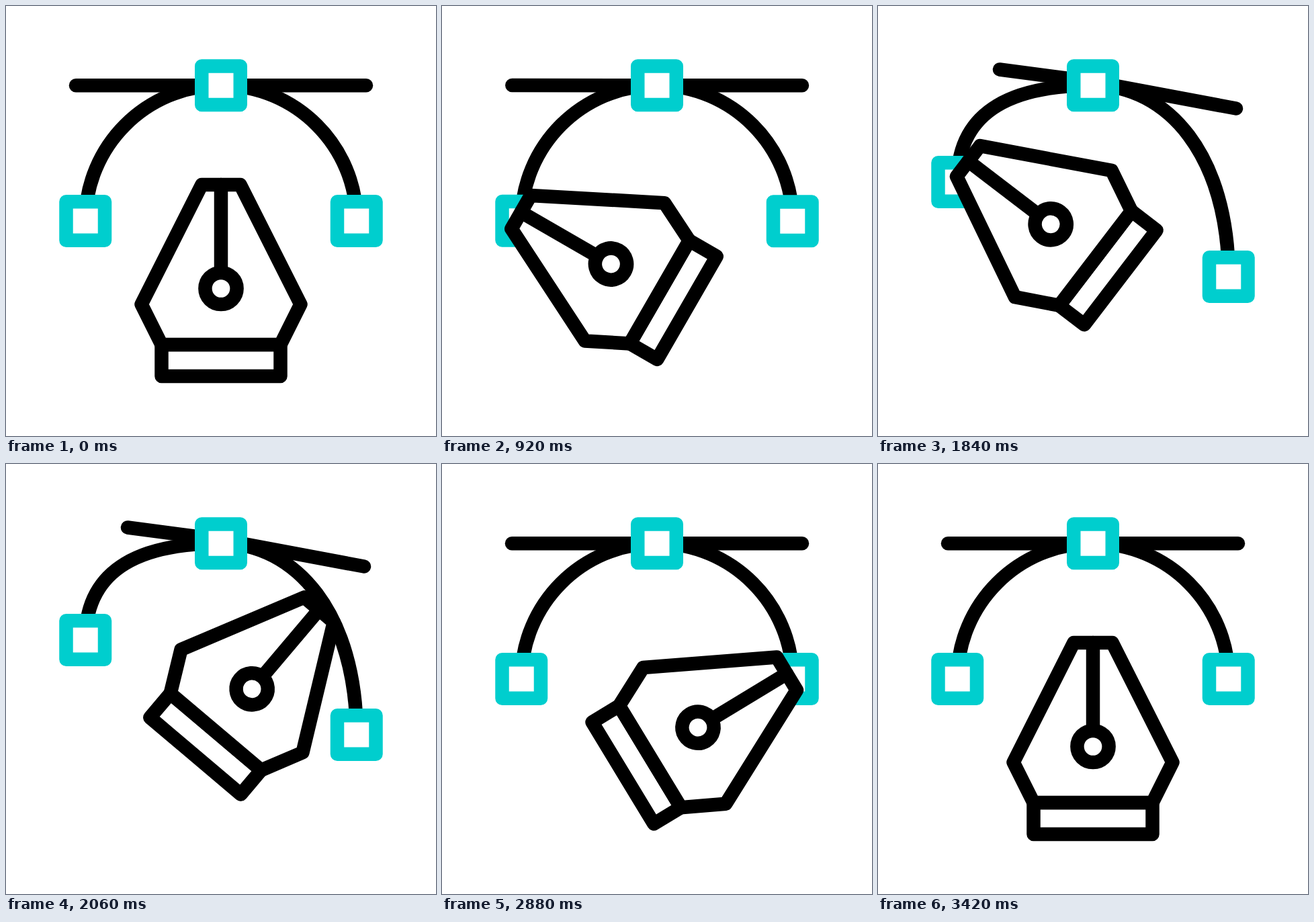
Recreate the animation shown at these times as an HTML page. Size 640 px wide and 640 px high, loop 3600 ms.

```html
<!DOCTYPE html>
<html lang="en">
<head>
<meta charset="utf-8">
<title>Pen tool</title>
<style>
  html, body { margin: 0; width: 100%; height: 100%; overflow: hidden; background: #fff; }
  svg { display: block; width: 100%; height: 100%; }
  path, rect, circle { stroke-width: 20.5; stroke-linecap: round; stroke-linejoin: round; }
  .line { fill: none; stroke: #000; }
  .solid { fill: #fff; stroke: #000; }
  .node { fill: #fff; stroke: #00cece; }
</style>
</head>
<body>
<svg viewBox="0 0 640 640">
  <path id="handle" class="line"/>
  <path id="curve" class="line"/>
  <rect class="node" x="291.25" y="89.5" width="57.5" height="57.5"/>
  <rect id="left" class="node" x="89.5" width="57.5" height="57.5"/>
  <rect id="right" class="node" x="493" width="57.5" height="57.5"/>
  <!-- pen, with its origin at the middle of the base -->
  <g id="pen">
    <path class="solid" d="M-88.5-47V0H88.5V-47Z"/>
    <path class="solid" d="M-28.7-285H28.7L118.5-107L88.5-47H-88.5L-118.5-107Z"/>
    <path class="line" d="M0-285V-155"/>
    <circle class="solid" cy="-130.5" r="23.6"/>
  </g>
</svg>
<script>
const LOOP = 3600;
const $ = id => document.getElementById(id);
const lerp = (a, b, k) => a + (b - a) * k;

// Bezier easing with flat ends; a and b are the x of its control points
function ease(a, b) {
  return x => {
    let lo = 0, hi = 1, u = 0.5;
    for (let i = 0; i < 24; i++) {
      u = (lo + hi) / 2;
      const v = 1 - u;
      if (3 * v * v * u * a + 3 * v * u * u * b + u * u * u < x) lo = u; else hi = u;
    }
    return u * u * (3 - 2 * u);
  };
}
const smooth = ease(1 / 3, 2 / 3);
const fast = ease(1 / 3, 0.5);
const slow = ease(0.5, 2 / 3);

// start, end, easing, from [x, y, angle], to, bend of the path
const rest = [320, 551, 0];
const grabL = [364.5, 449.5, -60];
const dropL = [366.5, 401, -60];
const grabR = [238.8, 443.8, 84.7];
const dropR = [269.2, 459.5, 59];
const moves = [
  [0, 720, smooth, rest, grabL, [0, 0]],
  [900, 1480, fast, grabL, dropL, [0, 0]],
  [1780, 2225, smooth, dropL, grabR, [4.5, 4.5]],
  [2225, 2660, smooth, grabR, dropR, [0, 0]],
  [2860, 3420, smooth, dropR, rest, [0, 0]]
];

const part = (t, a, b) => Math.min(1, Math.max(0, (t - a) / (b - a)));

function penAt(t) {
  let pose = rest;
  for (const [a, b, fn, from, to, bend] of moves) {
    if (t < a) break;
    const k = fn(part(t, a, b));
    pose = from.map((v, i) => lerp(v, to[i], k) + 4 * k * (1 - k) * (bend[i] || 0));
  }
  return pose;
}

// 0: even arch, 1: fully pulled
const pullAt = t => t < 2225 ? fast(part(t, 900, 1480)) : 1 - slow(part(t, 2225, 2660));

function draw(t) {
  const p = pullAt(t);
  const yl = lerp(320, 262, p), yr = lerp(320, 403, p);
  const bl = yl - 111.5, br = lerp(208.5, 223, p);
  $("left").setAttribute("y", yl - 28.75);
  $("right").setAttribute("y", yr - 28.75);
  $("curve").setAttribute("d",
    `M118.2 ${yl}C118.2 ${bl} 208.5 118 320 118C431.5 118 521.8 ${br} 521.8 ${yr}`);
  $("handle").setAttribute("d",
    `M${lerp(104, 181, p)} ${lerp(118.2, 94.5, p)}` +
    `L320 ${lerp(118.2, 112.7, p)}L${lerp(536, 533, p)} ${lerp(118.2, 152.5, p)}`);
  const [x, y, r] = penAt(t);
  $("pen").setAttribute("transform", `translate(${x} ${y}) rotate(${r})`);
}

const start = performance.now();
function tick(now) {
  draw(Math.max(0, now - start) % LOOP);
  requestAnimationFrame(tick);
}
draw(0);
requestAnimationFrame(tick);
</script>
</body>
</html>
```
